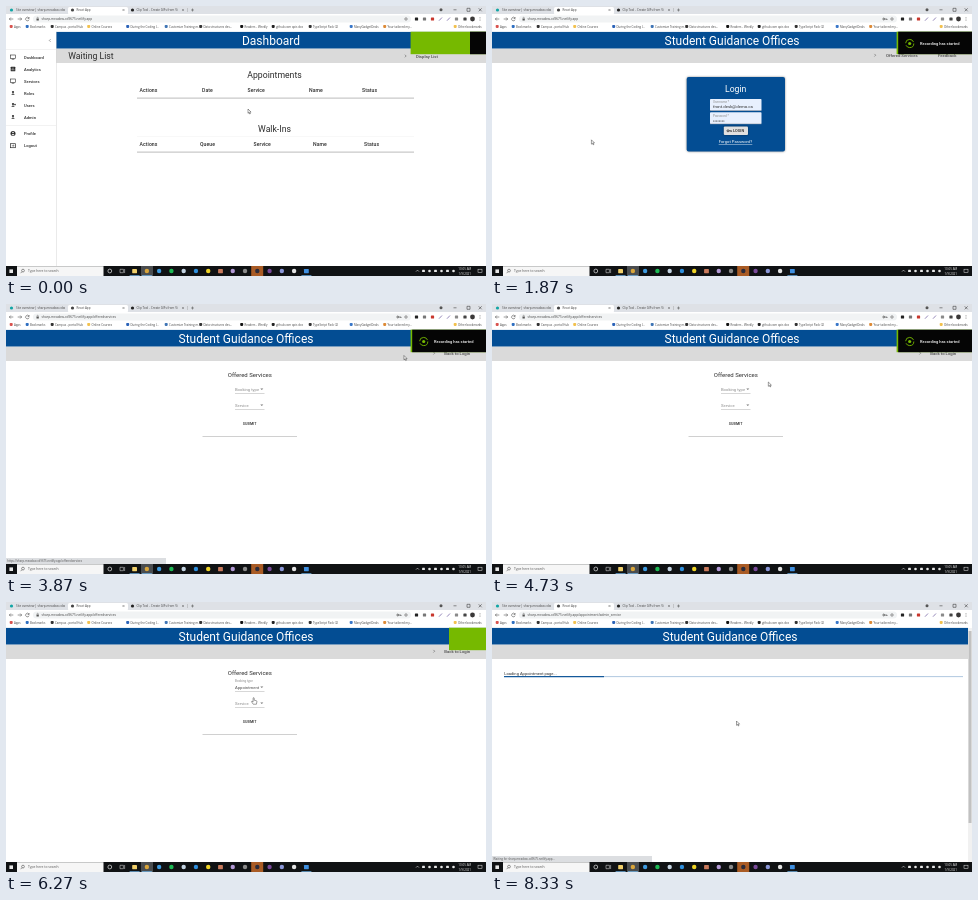
Write an HTML page that moves like this. It is 480x270 px and loops after 8390 ms.

```html
<!DOCTYPE html>
<html lang="en">
<head>
<meta charset="utf-8">
<title>Booking walkthrough</title>
<style>
  html, body { margin: 0; width: 100%; height: 100%; overflow: hidden; background: #fff; }
  svg { display: block; width: 100vw; height: 100vh; font-family: Roboto, Arial, sans-serif; }
  text { white-space: pre; }
  .ui { font-family: "Open Sans", Roboto, sans-serif; }
  .raised { filter: drop-shadow(0 .6px .9px rgba(0, 0, 0, .45)); }
  .floating { filter: drop-shadow(0 1.2px 1.5px rgba(0, 0, 0, .45)); }
</style>
</head>
<body>
<svg id="stage" viewBox="0 0 480 270"></svg>
<script>
const LOOP = 8390, STEP = 200 / 3;
const BLUE = '#034d93', INK = '#2c2c2c', SOFT = '#4a4a4a', GREY = '#8a8a8a';
const HOST = 'sharp-meadow-cd9675.netlify.app';
const TOP = 25.7;
const stage = document.getElementById('stage');

// ---- drawing helpers ----
function add(parent, tag, attrs = {}) {
  const node = document.createElementNS('http://www.w3.org/2000/svg', tag);
  for (const key in attrs) node.setAttribute(key, attrs[key]);
  return parent.appendChild(node);
}
const group = (parent, attrs) => add(parent, 'g', attrs);
const rect = (p, x, y, width, height, fill, more) =>
  add(p, 'rect', { x, y, width, height, fill, ...more });
const dot = (p, cx, cy, r, fill, more) => add(p, 'circle', { cx, cy, r, fill, ...more });
const line = (p, d, stroke = INK, width = .6) =>
  add(p, 'path', { d, fill: 'none', stroke, 'stroke-width': width });
function label(p, x, y, size, str, more) {
  const node = add(p, 'text', { x, y, 'font-size': size, fill: INK, ...more });
  node.textContent = str;
  return node;
}
const centred = (p, x, y, size, str, more) =>
  label(p, x, y, size, str, { 'text-anchor': 'middle', ...more });
const chevron = (p, x, y, dir) =>
  line(p, `M${x - dir * .6} ${y - 1.3}l${dir * 1.3} 1.3 ${-dir * 1.3} 1.3`, '#444', .5);
const medium = { 'font-weight': 500 };

// ---- timing helpers ----
const ease = u => u * u * (3 - 2 * u);
function track(t, keys) {
  let a = keys[0];
  for (const b of keys) {
    if (t < b[0]) {
      const u = b === a ? 0 : ease((t - a[0]) / (b[0] - a[0]));
      return a.slice(1).map((v, i) => v + (b[i + 1] - v) * u);
    }
    a = b;
  }
  return a.slice(1);
}
const within = (t, from, to) => t >= from && t < to;
const show = (node, on) => { node.style.display = on ? '' : 'none'; };

// ---- page parts ----
function header(p, title, left, right, mid) {
  rect(p, left, TOP, right - left, 17, BLUE);
  rect(p, left, TOP + 17, right - left, 14.3, '#dadada');
  centred(p, mid, 39, 12, title, { fill: '#fff' });
}

const navLink = (p, x, y, str) => label(p, x, y, 4.25, str, { ...medium, fill: SOFT });

function menuIcon(p, kind, y) {
  const x = 7;
  if (kind === 'box') {
    rect(p, x - 2.5, y - 2, 5, 3.6, 'none', { stroke: INK, 'stroke-width': .6 });
    line(p, `M${x - 1.3} ${y + 2.3}h2.6`);
  } else if (kind === 'chart') {
    rect(p, x - 2.3, y - 2.3, 4.6, 4.6, INK, { rx: .6 });
    line(p, `M${x - 1} ${y + 1.3}v-1.6M${x} ${y + 1.3}v-2.8M${x + 1} ${y + 1.3}v-1`, '#fff', .5);
  } else if (kind === 'exit') {
    rect(p, x - 2.6, y - 2, 5.2, 4, 'none', { stroke: INK, 'stroke-width': .7 });
    line(p, `M${x - 1.2} ${y}h2.3m-.9-.9l.9.9-.9.9`, INK, .5);
  } else {
    if (kind === 'badge') dot(p, x, y, 2.5, INK);
    const fill = kind === 'badge' ? '#fff' : INK;
    dot(p, x, y - 1, kind === 'badge' ? .8 : 1.1, fill);
    add(p, 'path', { d: `M${x - 1.7} ${y + 1.8}q1.7-2.8 3.4 0z`, fill });
    if (kind === 'group') dot(p, x + 2, y - .4, .8, INK);
  }
}

function table(p, title, y, cols) {
  centred(p, 268.5, y, 8.7, title);
  cols.forEach(([x, str]) => label(p, x, y + 14.2, 5.1, str, { ...medium, 'letter-spacing': .08 }));
  rect(p, 131, y + 20.3, 277, .5, '#777');
}

function dashboard() {
  const g = group(stage);
  header(g, 'Dashboard', 50, 480, 265);
  rect(g, 50, 26, .5, 234, '#d4d4d4');
  label(g, 62.3, 53, 8.7, 'Waiting List');
  chevron(g, 399.5, 50, 1);
  navLink(g, 410, 51.8, 'Display List');
  chevron(g, 44, 34.5, -1);
  rect(g, 0, 43, 50, .4, '#ddd');
  rect(g, 0, 119, 50, .4, '#ddd');
  [['Dashboard', 'box', 51], ['Analytics', 'chart', 63], ['Services', 'box', 75],
   ['Roles', 'person', 87], ['Users', 'group', 99], ['Admin', 'person', 111],
   ['Profile', 'badge', 127.5], ['Logout', 'exit', 139.7]].forEach(([name, kind, y]) => {
    menuIcon(g, kind, y);
    label(g, 18, y + 1.5, 4.1, name, medium);
  });
  table(g, 'Appointments', 71.5,
    [[133.5, 'Actions'], [196, 'Date'], [241.5, 'Service'], [303, 'Name'], [356, 'Status']]);
  table(g, 'Walk-Ins', 125.5,
    [[133.5, 'Actions'], [194, 'Queue'], [247.5, 'Service'], [307, 'Name'], [358, 'Status']]);
  rect(g, 131, 130.5, 277, .4, '#eee');
  return g;
}

function loginPage() {
  const g = group(stage);
  header(g, 'Student Guidance Offices', 0, 480, 240);
  chevron(g, 383, 49.2, 1);
  navLink(g, 394, 50.8, 'Offered Services');
  navLink(g, 446, 50.8, 'Feedback');
  rect(g, 194.7, 71, 98.3, 74.5, BLUE, { rx: 2, class: 'raised' });
  centred(g, 243.7, 86.4, 8.7, 'Login', { fill: '#fff' });
  [93, 106.3].forEach((y, i) => {
    rect(g, 218, y, 51.5, 11.8, '#e8f0fe', { rx: .8 });
    rect(g, 218, y + 11.4, 51.5, .5, '#8a8f99');
    label(g, 221, y + 4.3, 3.1, i ? 'Password *' : 'Username *', { fill: GREY });
  });
  label(g, 221, 102.4, 4.3, 'front.desk@demo.ca');
  for (let i = 0; i < 8; i++) dot(g, 221.7 + i * 1.45, 115, .5, INK);
  rect(g, 231.8, 120.6, 24.2, 8.4, '#e0e0e0', { rx: 1, class: 'raised' });
  dot(g, 236, 124.8, 1, 'none', { stroke: INK, 'stroke-width': .8 });
  line(g, 'M237 124.8h2.6v1m-.9-1v.8', INK, .7);
  label(g, 241, 126.3, 3.9, 'LOGIN', medium);
  centred(g, 243.5, 137, 4.2, 'Forgot Password?', { fill: '#fff', 'text-decoration': 'underline' });
  return g;
}

function select(p, y, name, value) {
  const wide = label(p, 229, y + 1.6, 4.2, name, { fill: GREY });
  const small = label(p, 229, y - 4.9, 3.1, name, { fill: GREY });
  const chosen = label(p, 229, y + 1.6, 4.2, value, { fill: SOFT });
  add(p, 'path', { d: `M254.3 ${y - .5}h3l-1.5 1.6z`, fill: '#777' });
  rect(p, 229, y + 4, 29.5, .35, '#8d8d8d');
  return (open, picked) => {
    show(wide, !open);
    show(small, open);
    show(chosen, picked);
  };
}

function popup(p, y, width, items) {
  const g = group(p);
  const height = items.length * 9.3 + 3.6;
  rect(g, 228, y, width, height, '#fff', { rx: .8, class: 'floating' });
  rect(g, 228, y + 1.6, width, 9.3, '#f5f5f5');
  items.forEach((str, i) => label(g, 232.7, y + 7.6 + i * 9.2, 4.2, str, { fill: SOFT }));
  return (t, from, to) => {
    show(g, within(t, from, to + 130));
    const [size] = track(t, [[from - 60, .5], [from + 200, 1]]);
    const [alpha] = track(t, [[from - 60, 0], [from + 140, 1], [to, 1], [to + 130, 0]]);
    g.setAttribute('transform', `translate(244 ${y + 6}) scale(${size}) translate(-244 ${-y - 6})`);
    g.setAttribute('opacity', alpha);
  };
}

function bookingPage() {
  const g = group(stage);
  header(g, 'Student Guidance Offices', 0, 480, 240);
  chevron(g, 428, 49.2, 1);
  navLink(g, 438.3, 50.8, 'Back to Login');
  centred(g, 243.8, 73.4, 6, 'Offered Services');
  const booking = select(g, 85, 'Booking type', 'Appointment');
  const service = select(g, 101, 'Service', 'Admin service');
  centred(g, 243.7, 120.8, 3.7, 'SUBMIT', { ...medium, 'letter-spacing': .1 });
  rect(g, 196.5, 132, 94.5, .4, '#888');
  const bookingMenu = popup(g, 79, 32.5, ['Appointment', 'Walk-in']);
  const serviceMenu = popup(g, 94.7, 38, ['Admin service']);
  return [g, t => {
    booking(t >= 5060, t >= 5860);
    service(t >= 6590, t >= 7590);
    bookingMenu(t, 5060, 5860);
    serviceMenu(t, 6590, 7590);
  }];
}

function loadingPage() {
  const g = group(stage);
  header(g, 'Student Guidance Offices', 0, 476, 238);
  rect(g, 476, 26, 4, 234, '#f1f1f1');
  rect(g, 476.5, 29, 3, 192, '#c1c1c1');
  label(g, 12.3, 72.7, 4.1, 'Loading Appointment page...');
  rect(g, 12, 74.2, 459, .9, '#a9c3dc');
  const bar = rect(g, 12, 74.1, 0, 1.1, BLUE);
  return [g, t => bar.setAttribute('width', track(t, [[8060, 0], [8330, 100]])[0])];
}

function toast() {
  const g = group(stage);
  const green = rect(g, 404.6, TOP, 75.4, 22.5, '#76b900');
  const black = rect(g, 406.2, TOP, 73.8, 22.5, '#050505');
  const note = group(g);
  dot(note, 417.7, 37.5, 4.1, 'none',
    { stroke: '#76b900', 'stroke-width': .9, 'stroke-dasharray': '10.7 2.2' });
  dot(note, 417.7, 37.5, 1.6, '#76b900');
  label(note, 428, 39.3, 4, 'Recording has started', { ...medium, fill: '#fff' });
  const slide = (node, x) => {
    node.setAttribute('x', x);
    node.setAttribute('width', 480 - x);
  };
  return t => {
    slide(green, track(t, [[6130, 404.6], [6400, 480]])[0]);
    slide(black, track(t, [[0, 464], [330, 406.2], [5870, 406.2], [6130, 480]])[0]);
    note.setAttribute('opacity', track(t, [[330, 0], [530, 1], [5790, 1], [5930, 0]])[0]);
  };
}

function statusBar() {
  const g = group(stage, { class: 'ui' });
  rect(g, 0, 254, 160, 6, '#dcdee1');
  const msg = label(g, 1.2, 258.3, 2.8, '', { fill: '#555' });
  return t => {
    const late = t >= 8200;
    msg.textContent = late ? `Waiting for ${HOST}...` : `https://${HOST}/offeredservices`;
    g.setAttribute('opacity', late ? 1 : track(t, [[2860, 0], [3000, 1], [4200, 1], [4400, 0]])[0]);
  };
}

function browser() {
  const g = group(stage, { class: 'ui' });
  rect(g, 0, 0, 480, TOP, '#fff');
  rect(g, 0, 0, 480, 8, '#dee1e6');
  rect(g, 62, 1, 60, 7.5, '#fff', { rx: 1.5 });
  rect(g, 181, 2, .4, 4, '#999');
  [[5.5, '#12a5a5', 10, 'Site overview | sharp-meadow-cd'], [66.5, '#444', 70.5, 'React App'],
   [126.5, '#222', 130.5, 'Clip Tool - Create GIFs from Vi']].forEach(([cx, fill, x, str]) => {
    dot(g, cx, 4, 1.6, fill);
    label(g, x, 5.2, 3, str, { fill: '#444' });
  });
  [58, 117.5, 177].forEach(x => line(g, `M${x - .9} 3.1l1.8 1.8m0-1.8l-1.8 1.8`, '#444', .45));
  line(g, 'M185 4h3m-1.5-1.5v3', '#444', .5);
  dot(g, 435, 3.7, 1.5, '#555');
  line(g, 'M447.5 3.8h3M461 2.3h3v3h-3zM472.7 2.3l3 3m0-3l-3 3', '#222', .5);

  line(g, 'M7.3 13h-4m1.5-1.5l-1.5 1.5 1.5 1.5M11.7 13h4m-1.5-1.5l1.5 1.5-1.5 1.5', '#444', .55);
  line(g, 'M23 12.2a1.8 1.8 0 1 0 .1 1.5m0-2.7v1.6h-1.5', '#444', .55);
  rect(g, 27, 9.5, 378, 7, '#f1f3f4', { rx: 3.5 });
  rect(g, 30.5, 12.6, 2.3, 1.9, '#555');
  line(g, 'M31 12.6v-.7a.65.65 0 0 1 1.3 0v.7', '#555', .4);
  const url = label(g, 35.6, 14.1, 3.2, '', { fill: '#444' });
  const key = group(g);
  dot(key, 391.7, 13, .9, 'none', { stroke: '#444', 'stroke-width': .7 });
  line(key, 'M392.6 13h2.5v.9m-.9-.9v.7', '#444', .6);
  dot(g, 400, 13, 1.2, 'none', { stroke: '#555', 'stroke-width': .6 });
  [[410.5, '#222'], [418.5, '#777'], [426.5, '#c8372d'], [450.5, '#8a8a8a'], [459, '#444']]
    .forEach(([x, fill]) => rect(g, x - 1.6, 11.4, 3.2, 3.2, fill, { rx: .6 }));
  line(g, 'M433 14.7l3-3.2M441 14.7l3-3.2', '#7a6aa8', .8);
  dot(g, 466.5, 13, 2.4, '#3a3838');
  [11.4, 13, 14.6].forEach(y => dot(g, 474, y, .45, '#444'));

  [[8, 'Apps', '#d9534f'], [24, 'Bookmarks', '#2f6fc1'], [49, 'Campus - portal Hub', '#333'],
   [85.5, 'Online Courses', '#f2c14e'], [124.5, 'During the Coding I...', '#2a62b8'],
   [163, 'Customize Training m...', '#3f75b5'], [197.5, 'Data structures des...', '#333'],
   [238.5, 'Readers - Weekly', '#111'], [270, 'github.com apis doc', '#222'],
   [307, 'TypeScript Pack (2)', '#333'], [348, 'ManyGadgetDeals', '#3977c9'],
   [381.5, 'Your tailored my...', '#dd8a36'], [452, 'Other bookmarks', '#f2c14e']]
    .forEach(([x, str, fill]) => {
      rect(g, x - 4.3, 18.9, 3, 3, fill, { rx: .8 });
      label(g, x, 21.6, 2.9, str, { fill: '#444' });
    });
  return t => {
    const path = t < 3530 ? '' : t < 8130 ? '/offeredservices' : '/appointment/admin_service';
    url.textContent = HOST + path;
    show(key, t >= 1790);
  };
}

function taskbar() {
  const g = group(stage, { class: 'ui' });
  const pale = '#e8e8e8';
  rect(g, 0, 260, 480, 10, '#101214');
  rect(g, 3.4, 263.4, 3.6, 3.6, pale);
  rect(g, 11, 260.2, 86.5, 9.8, '#f6f6f6');
  dot(g, 17, 264.6, 1.4, 'none', { stroke: '#333', 'stroke-width': .5 });
  line(g, 'M16 265.7l-1.4 1.5', '#333', .5);
  label(g, 22, 266.2, 3.35, 'Type here to search', { fill: '#555' });
  dot(g, 103.8, 265, 1.9, 'none', { stroke: pale, 'stroke-width': .7 });
  line(g, 'M114 263.3h3.4v3.4h-3.4zM118.6 263v4', pale, .5);
  rect(g, 135, 260, 12, 10, '#4a4d50');
  rect(g, 245.2, 260, 12, 10, '#a95b25');
  ['#f0cf6a', '#d9a53a', '#3f9be0', '#1db954', '#c4d4e2', '#2f8fdc', '#f0d426', '#c97a5c',
   '#b39ad6', '#8a8a8a', '#2b2b3a', '#7a4a9a', '#8b97d8', '#e4e4e4', '#3f8fe0'].forEach((fill, i) => {
    const x = 128.6 + i * 12.27;
    if (i % 7) dot(g, x, 265, 2.2, fill);
    else rect(g, x - 2.4, 263, 4.8, 4.2, fill, { rx: .4 });
  });
  [128.6, 140.9, 300.4].forEach(x => rect(g, x - 5, 269.3, 10, .7, '#76b9ed'));
  line(g, 'M410 265.6l1.5-1.5 1.5 1.5', pale, .6);
  [417.5, 423.5, 429.5, 435.5, 441.5, 447.5].forEach((x, i) =>
    i % 2 ? dot(g, x, 265, 1.3, pale) : rect(g, x - 1.4, 263.8, 2.8, 2.3, pale, { rx: .4 }));
  centred(g, 458.8, 264.1, 3, '10:05 AM', { fill: pale });
  centred(g, 458.8, 268.6, 3, '1/9/2021', { fill: pale });
  rect(g, 472, 263.2, 4, 3.2, 'none', { stroke: pale, 'stroke-width': .5 });
}

function pointer() {
  const g = group(stage, { stroke: '#111', 'stroke-width': .4, 'stroke-linejoin': 'round', fill: '#fff' });
  const arrow = add(g, 'path', { d: 'M0 0V4.3L1 3.4 1.7 5 2.4 4.7 1.7 3.1H3.1Z' });
  const hand = add(g, 'path', {
    d: 'M-.4.4a.55.55 0 0 1 1.1 0V2.4l2.2.5q.6.2.5.9l-.5 2.6H-.3L-1.9 4q-.1-.7.6-.6l.9.7z'
  });
  const path = [[60, 242, 103], [870, 26, 158], [1130, 28, 142.5], [1660, 28, 142.5],
    [2400, 403, 97], [2600, 405, 96.5], [3000, 416, 48], [3530, 416, 49], [3860, 398, 51.5],
    [4130, 384, 56], [4990, 247, 84], [5400, 246, 84.5], [5860, 246, 84.5], [6460, 248, 99.5],
    [6660, 248, 99.5], [7130, 244.5, 99.5], [7590, 244.5, 99.5], [7990, 244.5, 119]];
  const hands = [[1000, 1790], [2860, 3590], [4930, 8060]];
  return t => {
    const over = hands.some(([from, to]) => within(t, from, to));
    show(hand, over);
    show(arrow, !over);
    g.setAttribute('transform', `translate(${track(t, path)})`);
  };
}

// ---- assembly, back to front ----
rect(stage, 0, 0, 480, 270, '#fff');
const home = dashboard();
const login = loginPage();
const [booking, drawBooking] = bookingPage();
const [loading, drawLoading] = loadingPage();
const parts = [drawBooking, drawLoading, browser(), toast(), statusBar()];
taskbar();
parts.push(pointer());

function draw(t) {
  show(home, t < 1790);
  show(login, within(t, 1790, 3530));
  show(booking, within(t, 3530, 8130));
  show(loading, t >= 8130);
  parts.forEach(part => part(t));
}

function tick() {
  const t = performance.now() % LOOP;
  draw(Math.floor((t + 5) / STEP) * STEP);
  requestAnimationFrame(tick);
}
tick();
</script>
</body>
</html>
```
